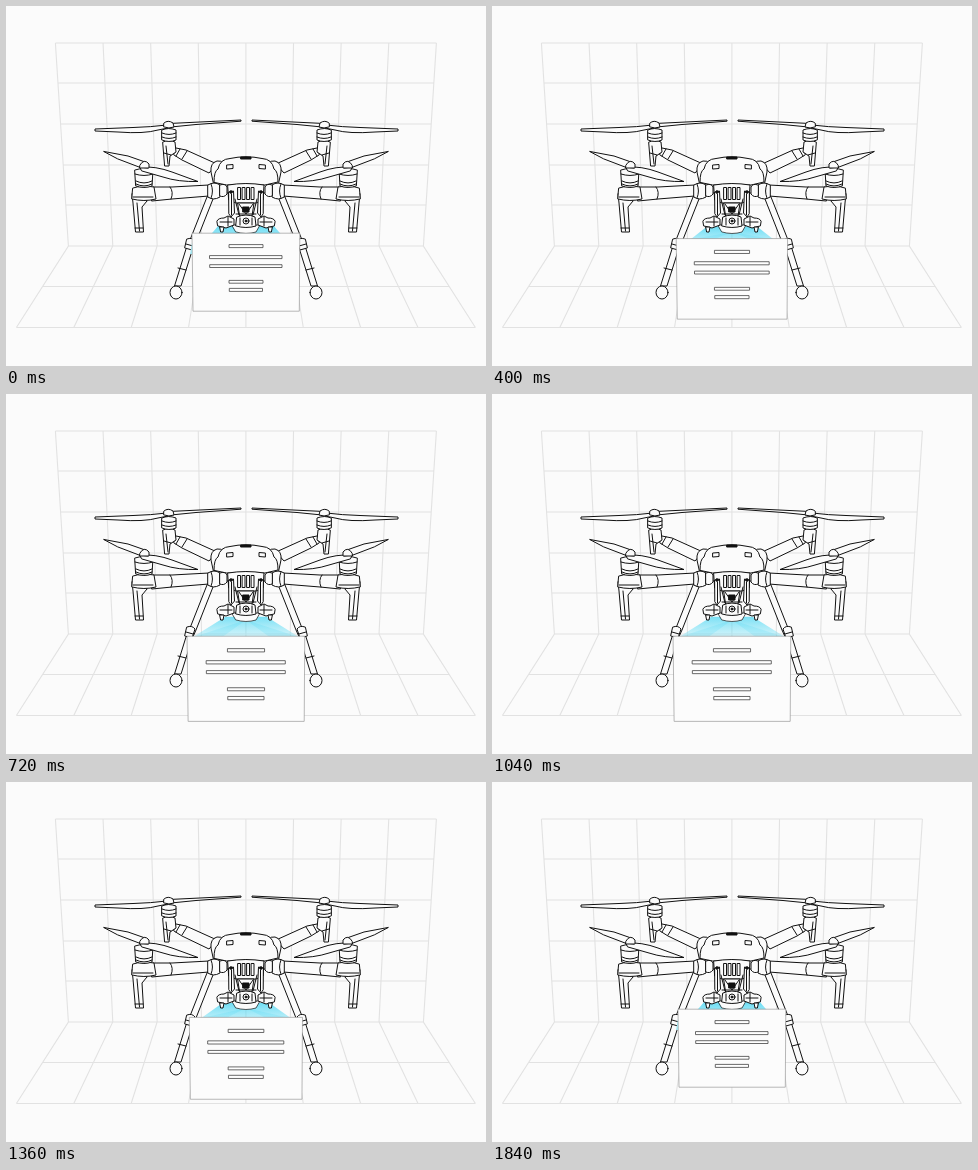
These frames come from a looping animation (480 by 360 pixels, 2 s). An HTML page:

```html
<!DOCTYPE html>
<html lang="en">
<head>
<meta charset="utf-8">
<title>Drone scanning a card</title>
<style>
  html, body { margin: 0; width: 100%; height: 100%; overflow: hidden; background: #fbfbfb; }
  svg { display: block; width: 100vw; height: 100vh; }
  .grid { fill: none; stroke: #e2e2e2; stroke-width: 1.1; }
  .ink { fill: #fbfbfb; stroke: #111; stroke-width: 1; stroke-linejoin: round; stroke-linecap: round; }
  .line { fill: none; }
  .dark { fill: #111; }
  .card * { vector-effect: non-scaling-stroke; }
  .sheet { fill: #fcfcfc; stroke: #888; stroke-width: .6; }
  .bar { fill: #fff; stroke: #444; stroke-width: .8; }
</style>
</head>
<body>
<svg viewBox="0 0 480 360">
  <defs>
    <linearGradient id="glow" gradientUnits="userSpaceOnUse" x1="0" y1="217" x2="0" y2="245">
      <stop offset="0" stop-color="#22cdf0" stop-opacity=".75"/>
      <stop offset="1" stop-color="#6fe2f8" stop-opacity=".25"/>
    </linearGradient>

    <g id="rear">
      <path d="M170 142L180 144L211 158L203 167L176 154L168 149Z"/>
      <path class="line" d="M174 143L170 150M181 145L176 153"/>
      <path d="M157 136Q163 133 169 136L170 146L164 150L163 160H159Z"/>
      <path class="line" d="M160 140L162 158M158 147L165 149"/>
      <path d="M156 124Q162 121 170 124L170 134Q163 137 156 134Z"/>
      <path class="line" d="M156 127Q163 130 170 127M156 131Q163 134 170 131"/>
      <path d="M161 119Q145 121 127 121.500L89 123V125L112 126Q138 128 152 124L162 122Z"/>
      <path d="M163 117.500L235 114V115.200L190 118.500L165 121Z"/>
      <path d="M158 117Q162 113.500 167 117L168 121Q163 123 158 121Z"/>
    </g>

    <g id="leg">
      <path d="M201 191L184 234L180 243L168.500 280H175L186 245L190 236L207 193Z"/>
      <path d="M181 233Q186 231 189 235L186 244L179 242Z"/>
      <path class="line" d="M180 238L187 240M172 262L180 264"/>
      <ellipse cx="170" cy="286.500" rx="6" ry="6.500"/>
    </g>

    <g id="front">
      <path d="M126 188L127 197L129.500 226H137.500L136 201L141 195Z"/>
      <path class="line" d="M131 197L133.500 225M129 222H137"/>
      <path d="M147 181L166 181L203 179V190L166 193L146 195Z"/>
      <path class="line" d="M164 181Q168 186 165 193"/>
      <path d="M127 182Q136 179 148 181L150 193Q138 196 126 193Z"/>
      <path class="line" d="M127 191H147"/>
      <path d="M129 164Q138 161 147 164L146 180Q138 183 130 180Z"/>
      <path class="line" d="M129 168Q138 171 147 168M130 175Q138 179 146 175M130 178Q138 182 146 178"/>
      <path d="M134 161Q150 160 166 166L192 175.500Q172 176 157 171L136 165Z"/>
      <path d="M98 145.500L122 150L142 157V162L133 161L112 153Z"/>
      <path d="M134 159Q138 152 143 158V162H134Z"/>
      <path d="M202 179Q208 175 214 179V191Q207 195 202 191Z"/>
      <path d="M214 179Q219 177 221 181V188Q218 192 214 190Z"/>
      <path class="line" d="M205 178Q208 185 205 192"/>
    </g>

    <g id="mount">
      <path d="M223 186L227.500 185L228.500 207L225 211L223 208Z"/>
      <path class="line" d="M225.500 188V209M229 193L233 209"/>
      <path d="M211 215Q212 212 218 212L222 210L228 213V219L220 222L212 220Z"/>
      <path class="line" d="M214 216H226M222 211V220"/>
      <path d="M214 221H218L217 226H215Z"/>
      <circle class="dark" cx="225" cy="186" r="1.300"/>
    </g>
  </defs>

  <path id="room" class="grid"/>

  <g class="ink">
    <use href="#rear"/><use href="#rear" transform="matrix(-1 0 0 1 481 0)"/>
    <use href="#leg"/><use href="#leg" transform="matrix(-1 0 0 1 480 0)"/>
    <path d="M208 180L205 166Q204 157 211 155Q215 154 218 158H262Q265 154 269 155Q276 157 275 166L272 180L259 187H221Z"/>
    <path d="M208 176Q208 165 212 163Q214 153 224 152.500Q240 149 256 152.500Q266 153 268 163Q272 165 272 176L259 179H221Z"/>
    <path class="dark" d="M235 151H245V153H235Z"/>
    <path d="M221 159L227 158.500V162.500L221 163ZM259 159L253 158.500V162.500L259 163Z"/>
    <use href="#front"/><use href="#front" transform="matrix(-1 0 0 1 480 0)"/>
  </g>

  <path id="beam" fill="url(#glow)"/>
  <path id="rays" fill="#22cdf0" fill-opacity=".14"/>
  <path id="edge" d="M186 237L184 248H187V237Z" fill="#a6edf9"/>

  <g class="ink">
    <path d="M222 179Q240 176 258 179L257 194L250 197H230L223 194Z"/>
    <path d="M232 181.500H234.500V193.500H232ZM236.500 181.500H239V193.500H236.500ZM241 181.500H243.500V193.500H241ZM245.500 181.500H248V193.500H245.500Z"/>
    <path d="M232 197H248L246 210H234Z"/>
    <path class="dark" d="M237 201H243V206H237Z"/>
    <path class="line" d="M233 198L240 208L247 198M230 208H250"/>
    <path d="M226 219H254L250 226Q240 229 230 226Z" stroke-width=".7"/>
    <use href="#mount"/><use href="#mount" transform="matrix(-1 0 0 1 480 0)"/>
    <path d="M231 211Q240 207 249 211L250 220Q240 223 230 220Z"/>
    <path class="line" d="M234 212V219M246 212V219"/>
    <circle cx="240" cy="215" r="3"/><circle class="dark" cx="240" cy="215" r="1"/>
  </g>

  <g id="card" class="card">
    <path class="sheet" d="M-54 0H53.800L53.300 78H-53Z"/>
    <path class="bar" d="M-17 11.400H17V14.400H-17ZM-36.500 22.400H36V25.400H-36.500ZM-36.300 31.500H36V34.300H-36.300ZM-17 47.200H17V50H-17ZM-16.700 55.200H16.500V58.200H-16.700Z"/>
  </g>
</svg>
<script>
  const $ = id => document.getElementById(id);
  const mix = (a, b, k) => a + (b - a) * k;

  // Room: back wall and floor in perspective
  const MID = 239.9;
  const wallX = y => mix(190.5, 177.5, (y - 37) / 203);
  const floorX = y => mix(177.5, 229.5, (y - 240) / 81.5);
  const row = (y, half) => `M${MID - half} ${y}H${MID + half}`;
  let room = [37, 77, 118, 159, 199, 240].map(y => row(y, wallX(y))).join('');
  room += [280.5, 321.5].map(y => row(y, floorX(y))).join('');
  for (let i = -4; i <= 4; i++) {
    const at = half => MID + half * i / 4;
    room += `M${at(190.5)} 37L${at(177.5)} 240L${at(229.5)} 321.5`;
  }
  $('room').setAttribute('d', room);

  // Drop of the card: 0 is highest, 1 is lowest
  const drops = [0, .11, .33, .645, .92, 1, .92, .75, .5, .24, .07, 0];
  const LOOP = 2000, FIRST = 240, STEP = 160;

  function pose(q) {
    const top = mix(227.2, 243.5, q), size = mix(1, 1.1, q);
    $('card').setAttribute('transform', `translate(240 ${top}) scale(${size})`);

    const inX = mix(27, 20, q), inY = mix(219, 223, q), out = mix(35, 55, q);
    const low = top + 1;
    $('beam').setAttribute('d',
      `M${240 - inX} ${inY}H${240 + inX}L${240 + out} ${low}H${240 - out}Z`);
    $('rays').setAttribute('d',
      `M240 226L${240 - out} ${low}H${240 - out * .45}ZM240 226L${240 + out} ${low}H${240 + out * .45}Z`);
    $('edge').setAttribute('opacity', Math.max(0, 1 - q * 4));
  }

  function tick() {
    const t = performance.now() % LOOP;
    pose(drops[t < FIRST ? 0 : 1 + Math.floor((t - FIRST) / STEP)]);
    requestAnimationFrame(tick);
  }
  tick();
</script>
</body>
</html>
```
